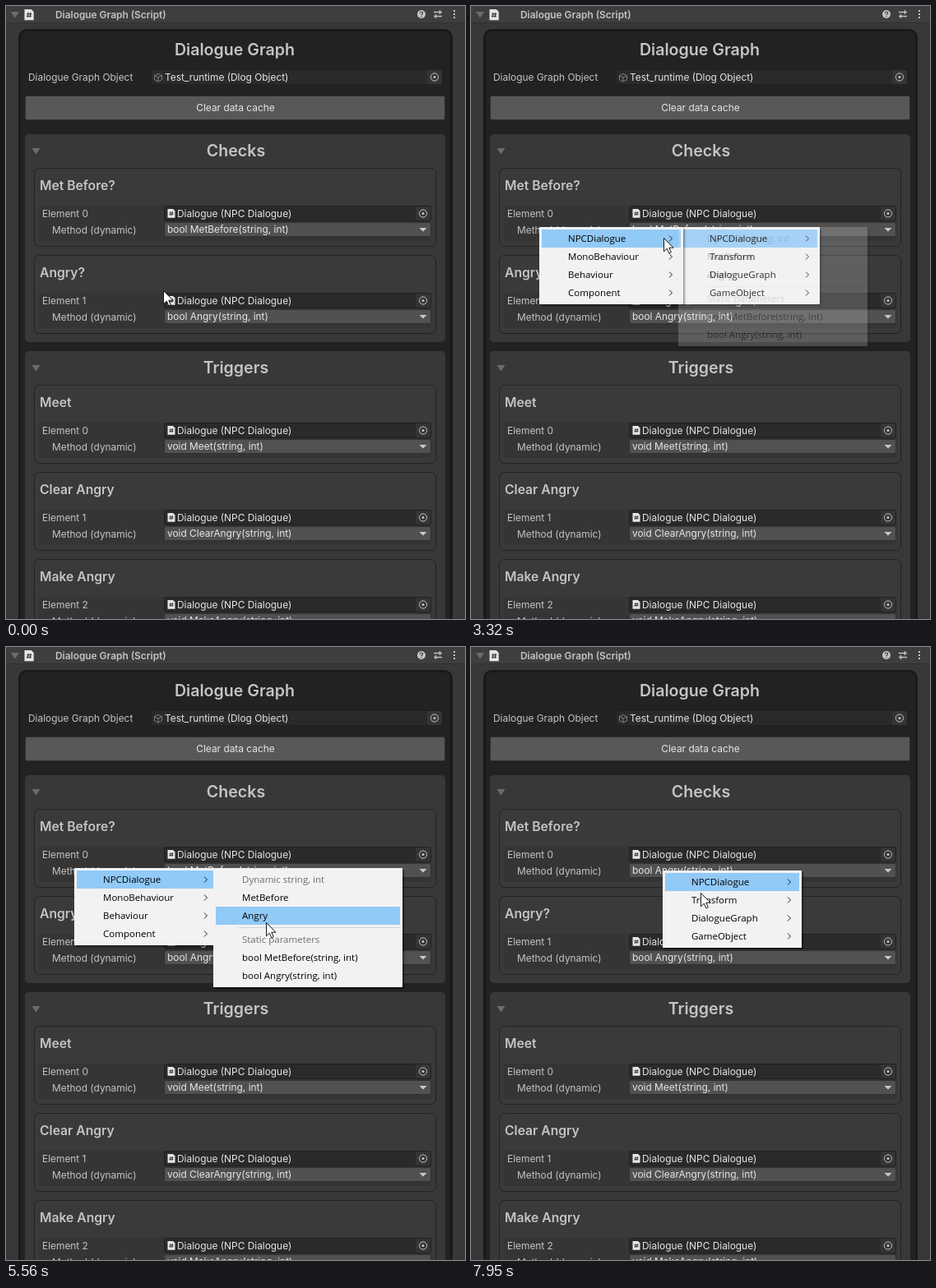
An HTML page that plays this animation: 558x746 px, repeating every 8000 ms.

```html
<!DOCTYPE html>
<html lang="en">
<head>
<meta charset="utf-8">
<title>Dialogue Graph inspector</title>
<style>
html, body { margin: 0; width: 100%; height: 100%; overflow: hidden; background: #383838; }
svg { display: block; }
text { font: 11.9px Inter, Roboto, sans-serif; fill: #c4c4c4; white-space: pre; }
.bold { font-weight: 600; }
.title { font-size: 19.6px; font-weight: 600; }
.group { font-size: 15.7px; font-weight: 600; }
.light { fill: #e6e6e6; }
.mid { text-anchor: middle; }
.menu { filter: drop-shadow(2px 2px 1px rgba(0, 0, 0, .45)); }
.menu text { font: 11.5px "Open Sans", "Noto Sans", sans-serif; fill: #000; }
.menu .off { fill: #6d6d6d; }
</style>
</head>
<body>
<svg id="stage" width="558" height="746" viewBox="0 0 558 746"></svg>
<script>
const LOOP = 8000, ROW = 22, GAP = 7, PAD = 3;
const stage = document.getElementById('stage');

function add(parent, tag, attrs, content) {
  const el = document.createElementNS('http://www.w3.org/2000/svg', tag);
  for (const key in attrs) el.setAttribute(key, attrs[key]);
  if (content) el.textContent = content;
  parent.appendChild(el);
  return el;
}
const rect = (x, y, width, height, fill, more, parent = stage) =>
  add(parent, 'rect', { x, y, width, height, fill, ...more });
const text = (x, y, content, cls = '', parent = stage) =>
  add(parent, 'text', { x, y, class: cls }, content);
const path = (d, attrs, parent = stage) => add(parent, 'path', { d, ...attrs });
const show = (el, alpha) => {
  el.style.display = alpha > 0 ? '' : 'none';
  el.style.opacity = alpha;
};

// ---- Inspector ----
function foldout(x, y) {
  path(`M${x} ${y}h10l-5 7.5z`, { fill: '#6c6c6c' });
}
function scriptIcon(x, y, s) {
  const g = add(stage, 'g', { transform: `translate(${x} ${y}) scale(${s})` });
  path('M0 0h8l3 3v10h-11z', { fill: '#e6e6e6' }, g);
  path('M4.6 3.8l-1 6M7.4 3.8l-1 6M2.6 5.7h6M2.4 8h6', { stroke: '#2c2c2c', fill: 'none' }, g);
}
function objectField(x, y, right) {
  const box = rect(x + .5, y + .5, right - x - 1, 18, '#2a2a2a', { rx: 2, stroke: '#202020' });
  rect(right - 19, y + 1, 18, 17, '#353535', { rx: 2 });
  add(stage, 'circle', { cx: right - 10, cy: y + 9.5, r: 4.6, fill: 'none', stroke: '#c4c4c4' });
  add(stage, 'circle', { cx: right - 10, cy: y + 9.5, r: 1.5, fill: '#c4c4c4' });
  return box;
}
function group(y, name, index, method) {
  rect(34.5, y - .5, 488, 95, '#3a3a3a', { rx: 6, stroke: '#222' });
  text(41, y + 26, name, 'group');
  rect(40, y + 45, 477, 43, '#353535');
  text(44, y + 59, 'Element ' + index);
  text(56, y + 79, 'Method (dynamic)');
  const field = objectField(192, y + 45, 517);
  scriptIcon(196.5, y + 49, .82);
  text(208, y + 59, 'Dialogue (NPC Dialogue)', 'light');
  rect(192.5, y + 65.5, 324, 17, '#515151', { rx: 2, stroke: '#303030' });
  path(`M502.5 ${y + 72}h9l-4.5 4.5z`, { fill: '#c8c8c8' });
  return { field, method: text(196, y + 78, method, 'light') };
}

rect(0, 0, 558, 746, '#383838');
rect(0, 0, 558, 20, '#3e3e3e');
rect(0, 20, 558, 1, '#303030');
foldout(6, 7);
scriptIcon(22.5, 4, 1.02);
text(60, 15, 'Dialogue Graph (Script)', 'bold');
add(stage, 'circle', { cx: 505, cy: 10, r: 5, fill: '#c4c4c4' });
path('M503.4 8.7q0-1.7 1.6-1.7t1.6 1.4q0 .9-1.6 2v.6M505 12v1.3',
  { stroke: '#3e3e3e', fill: 'none', 'stroke-width': 1.2 });
path('M520 7.5h10M520 12.5h10M527.5 5v5M522.5 10v5',
  { stroke: '#c4c4c4', fill: 'none', 'stroke-width': 1.3 });
for (const y of [5, 9, 13]) rect(544, y, 2, 2, '#c4c4c4');

rect(15, 28, 528, 760, '#191919', { rx: 10 });
rect(18, 31, 522, 760, '#222', { rx: 7 });
text(278, 60, 'Dialogue Graph', 'title mid');
text(27, 91, 'Dialogue Graph Object');
objectField(176, 77, 531);
path('M185 82.5l4.5 2.2v5l-4.5 2.3l-4.5-2.3v-5zM180.5 84.7l4.5 2.3l4.5-2.3M185 87v5',
  { stroke: '#8a8a8a', fill: 'none', 'stroke-width': .9 });
text(193, 91, 'Test_runtime (Dlog Object)', 'light');
rect(23.5, 109.5, 510, 29, '#585858', { rx: 2, stroke: '#303030' });
text(279, 128, 'Clear data cache', 'light mid');

rect(23, 156, 511, 253, '#383838', { rx: 5 });
foldout(31.5, 173);
text(279.5, 183, 'Checks', 'title mid');
const first = group(198, 'Met Before?', 0, 'bool MetBefore(string, int)');
const second = group(304, 'Angry?', 1, 'bool Angry(string, int)');

rect(23, 420, 511, 400, '#383838', { rx: 5 });
foldout(31.5, 437);
text(279.5, 447, 'Triggers', 'title mid');
['Meet', 'Clear Angry', 'Make Angry'].forEach((name, i) =>
  group(462 + 106 * i, name, i, `void ${name.replace(' ', '')}(string, int)`));

// ---- Menus: '-' is a separator, '~' marks a disabled row ----
function makeMenu(x, y, w, items, arrows, opens, closes, fade) {
  const g = add(stage, 'g', { class: 'menu' });
  const back = rect(x, y, w, 0, '#f2f2f2', {}, g);
  const mark = rect(x + PAD, 0, w - 2 * PAD, ROW, '#91c9f7', {}, g);
  const rows = [];
  let top = y + PAD;
  for (const item of items) {
    if (item === '-') {
      rect(x + 31, top + 3, w - 35, 1, '#d2d2d2', {}, g);
      top += GAP;
      continue;
    }
    const off = item[0] === '~';
    text(x + 35, top + 15, off ? item.slice(1) : item, off ? 'off' : '', g);
    if (arrows) path(`M${x + w - 17} ${top + 7.5}l3.5 3.5l-3.5 3.5`, { fill: 'none', stroke: '#222' }, g);
    rows.push({ top, off });
    top += ROW;
  }
  const h = top + PAD - y;
  back.setAttribute('height', h);
  return { g, mark, rows, x, y, w, h, opens, closes, fade };
}
const SOFT = [.25, .55, .87, 1], SLOW = [.2, .45, .7, .9, 1];
const targets = ['NPCDialogue', 'Transform', 'DialogueGraph', 'GameObject'];
const types = ['NPCDialogue', 'MonoBehaviour', 'Behaviour', 'Component'];
const methods = ['~Dynamic string, int', 'MetBefore', 'Angry', '-',
  '~Static parameters', 'bool MetBefore(string, int)', 'bool Angry(string, int)'];
const menus = [
  makeMenu(255, 269, 169, targets, true, 1260, 6710, SOFT),
  makeMenu(83, 269, 175, types, true, 2030, 6710, SOFT),
  makeMenu(252, 269, 230, methods, false, 3320, 6710, SLOW),
  makeMenu(233, 272, 169, targets, true, 7560, LOOP, SOFT)
];

// The chosen row lingers briefly after the menus close
const chosen = add(stage, 'g', { class: 'menu' });
rect(255, 316, 224, ROW, '#91c9f7', {}, chosen);
text(287, 331, 'Angry', '', chosen);

// ---- Pointer ----
const ring = add(stage, 'circle', { r: 12, fill: '#dcdc10', 'fill-opacity': .75 });
const arrow = path('M.5 .5v16.3l3.8-3.6l2.5 5.6l2.5-1.1l-2.5-5.5h5.2z',
  { fill: '#fff', stroke: '#000', 'stroke-width': .9 });

// start, end, steps, way points
const moves = [
  [30, 520, 11, [191, 346], [196, 355], [215, 340], [240, 300], [255, 269]],
  [1550, 1750, 5, [255, 269], [321, 279]],
  [2690, 3040, 8, [321, 279], [234, 282]],
  [3830, 4610, 16, [234, 282], [237, 278], [268, 286], [296, 302], [304, 328],
    [307, 330], [308, 312], [309, 306], [309, 317]],
  [4660, 4710, 2, [309, 317], [309, 329]],
  [5040, 5190, 4, [309, 329], [308, 319]],
  [5470, 6190, 16, [308, 319], [318, 340], [330, 372], [338, 384], [340, 380], [345, 350], [349, 331]],
  [6810, 7040, 6, [349, 331], [201, 281]],
  [7270, 7370, 3, [201, 281], [222, 269], [233, 272]],
  [7760, 7950, 5, [233, 272], [256, 287], [272, 298], [279, 299]]
];
const clicks = [1210, 6660, 7510];

function pointer(t) {
  let at = moves[0][3];
  for (const [start, end, steps, ...pts] of moves) {
    if (t < start) break;
    const step = Math.floor((t - start) / (end - start) * (steps - 1) + 1e-6) + 1;
    const pos = Math.min(1, step / steps) * (pts.length - 1);
    const i = Math.min(pts.length - 2, Math.floor(pos));
    at = [0, 1].map(k => pts[i][k] + (pts[i + 1][k] - pts[i][k]) * (pos - i));
  }
  return at;
}
function fadeAt(t, opens, closes, fade) {
  if (t < opens || t >= closes) return 0;
  return fade[Math.min(fade.length - 1, Math.floor((t - opens) / 48))];
}
const inside = ([px, py], x, y, w, h) => px >= x && px < x + w && py >= y && py < y + h;

function draw(t) {
  const [x, y] = pointer(t);
  const seen = pointer(Math.max(0, t - 50)); // hover trails the pointer by one tick
  const open = menus.filter(m => t >= m.opens && t < m.closes);
  const hit = open.filter(m => inside(seen, m.x, m.y, m.w, m.h)).pop();

  for (const m of menus) {
    show(m.g, fadeAt(t, m.opens, m.closes, m.fade));
    const hasChild = open.indexOf(m) < open.length - 1;
    let row = hasChild ? m.rows[0] : null;
    if (m === hit) row = m.rows.find(r => seen[1] >= r.top && seen[1] < r.top + ROW) || row;
    const lit = row && !row.off;
    m.mark.style.display = lit ? '' : 'none';
    if (lit) m.mark.setAttribute('y', row.top);
  }
  show(chosen, fadeAt(t, 6710, 6854, [.75, .5, .25]));
  first.method.textContent = `bool ${t < 6760 ? 'MetBefore' : 'Angry'}(string, int)`;
  second.field.setAttribute('stroke', inside([x, y], 193, 349, 323, 19) ? '#656565' : '#202020');

  show(ring, clicks.some(c => t >= c && t < c + 50) ? 1 : 0);
  ring.setAttribute('cx', x);
  ring.setAttribute('cy', y);
  arrow.setAttribute('transform', `translate(${Math.round(x)} ${Math.round(y)})`);
}

const began = performance.now();
function tick() {
  draw((performance.now() - began) % LOOP);
  requestAnimationFrame(tick);
}
tick();
</script>
</body>
</html>
```
